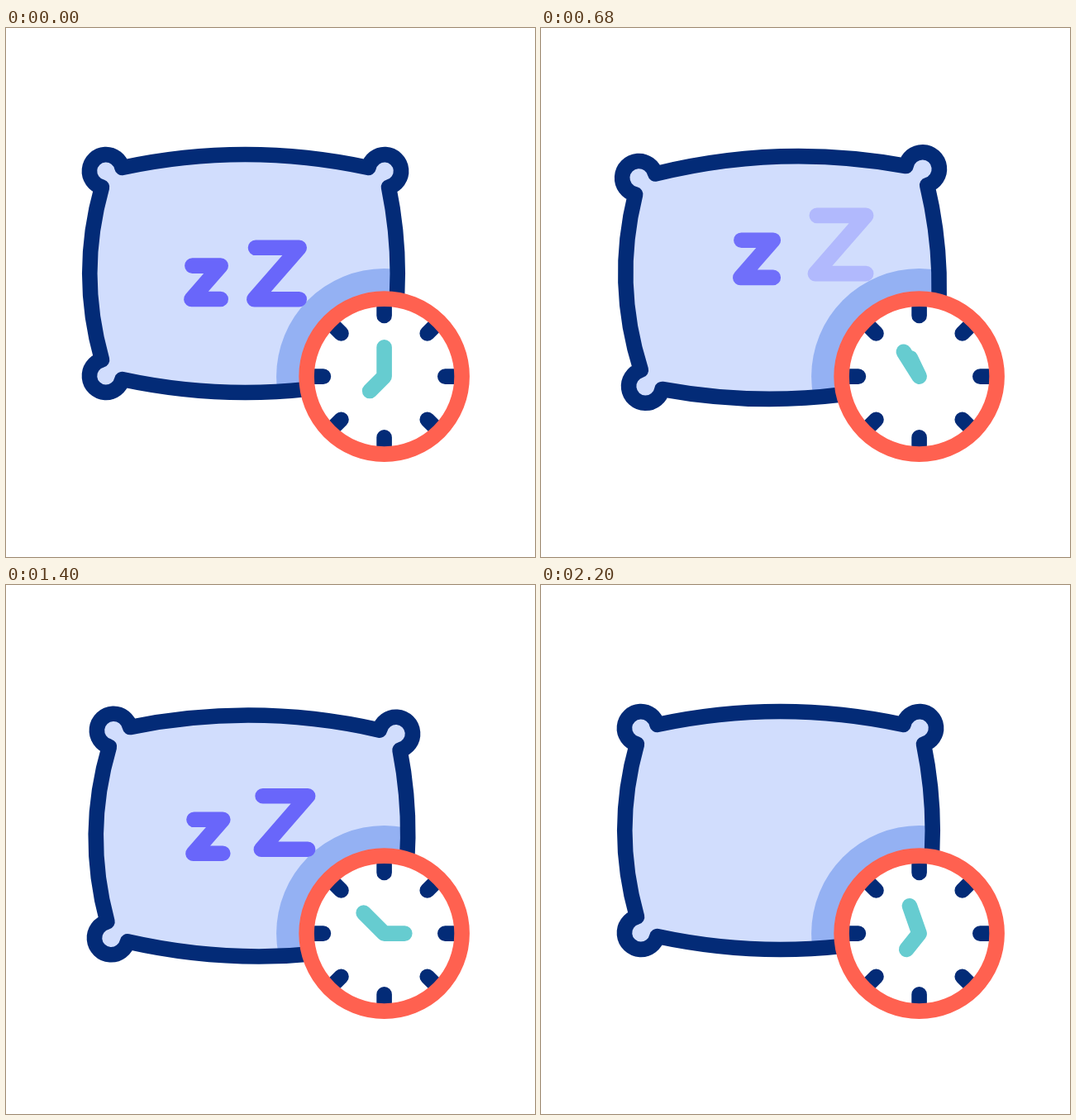
Recreate the animation shown at these times as an HTML page with a canvas. Size 640x640 px, loop 2.24 s.

```html
<!DOCTYPE html>
<html lang="en">
<head>
<meta charset="utf-8">
<title>Sleep time</title>
<style>
html, body { margin: 0; width: 100%; height: 100%; overflow: hidden; background: #fff; }
canvas { display: block; }
</style>
</head>
<body>
<canvas id="stage" width="640" height="640"></canvas>
<script>
const ctx = document.getElementById('stage').getContext('2d');
const LOOP = 2240, CYCLE = LOOP / 2, STEP = 40;
const NAVY = '#032b77', RED = '#ff6150', TEAL = '#66ccd0', VIOLET = '#6966fa';
const CLOCK = { x: 457.6, y: 421.6 };

// Outlines are centred on their own origin
const pillow = new Path2D(
  'M-149 -128 Q0 -160 149 -128 A20 20 0 1 1 173.5 -104.5 Q195 0 173.5 104.5 ' +
  'A20 20 0 1 1 149 128 Q0 160 -149 128 A20 20 0 1 1 -173.5 104.5 ' +
  'Q-203 0 -173.5 -104.5 A20 20 0 1 1 -149 -128Z');
const bigZ = new Path2D('M-25.5 -31.2 H27.2 L-27.2 31.2 H27.2');
const smallZ = new Path2D('M-16.8 -20.2 H17.5 L-17.8 20.2 H17.5');

// Pillow pose keys: time, x, y, degrees, scale
const poses = [
  [0, 289.5, 297, 0, 1],
  [440, 299, 300, 1.8, 1.045],
  [680, 294, 302, -1.8, 1.018],
  [1000, 289.5, 300.5, -0.9, 0.97],
  [1400, 299.5, 303.5, 0.67, 1.0134],
  [1720, 285.5, 297, 0, 0.976],
  [2160, 289.5, 297, 0, 1],
  [2240, 289.5, 297, 0, 1]
];
// Rise of each letter: time, distance
const bigRise = [[0, 0], [200, 4.5], [280, 9.5], [440, 21.5], [600, 30.3], [680, 35], [1120, 60]];
const smallRise = [[0, 0], [160, 0], [280, 3.5], [440, 13], [600, 21.7], [680, 28.5], [1120, 60]];

// Monotone cubic interpolation of column c
function ease(keys, c, t) {
  const slope = i => (keys[i + 1][c] - keys[i][c]) / (keys[i + 1][0] - keys[i][0]);
  const tangent = i => {
    if (i === 0 || i === keys.length - 1) return 0;
    const a = slope(i - 1), b = slope(i);
    return a * b > 0 ? 2 * a * b / (a + b) : 0;
  };
  let i = 0;
  while (i < keys.length - 2 && t >= keys[i + 1][0]) i++;
  const span = keys[i + 1][0] - keys[i][0], u = (t - keys[i][0]) / span, v = 1 - u;
  return keys[i][c] * v * v * (1 + 2 * u) + keys[i + 1][c] * u * u * (3 - 2 * u) +
    span * u * v * (tangent(i) * v - tangent(i + 1) * u);
}

function place(path, x, y, scale, angle = 0) {
  const placed = new Path2D();
  placed.addPath(path, new DOMMatrix().translate(x, y).rotate(angle).scale(scale));
  return placed;
}

function stroke(color, path) {
  ctx.strokeStyle = color;
  ctx.stroke(path);
}

function disc(radius) {
  const path = new Path2D();
  path.arc(CLOCK.x, CLOCK.y, radius, 0, 2 * Math.PI);
  return path;
}

// Point on the clock face, degrees clockwise from twelve
function polar(radius, degrees) {
  const a = degrees * Math.PI / 180;
  return [CLOCK.x + radius * Math.sin(a), CLOCK.y - radius * Math.cos(a)];
}

function drawPillow(t) {
  const [x, y, angle, scale] = [1, 2, 3, 4].map(c => ease(poses, c, t));
  const shape = place(pillow, x, y, scale, angle);
  ctx.fillStyle = '#d1ddfd';
  ctx.fill(shape);
  ctx.save();
  ctx.clip(shape);
  ctx.fillStyle = '#94b1f3';
  ctx.fill(disc(130.5));
  ctx.restore();
  stroke(NAVY, shape);
}

function drawLetter(path, x, y, drift, growth, rise, fadeAt, t) {
  const d = ease(rise, 1, t);
  ctx.globalAlpha = Math.max(0, Math.min(1, 1 - (t - fadeAt) / 130));
  stroke(VIOLET, place(path, x + drift * d, y - d, 1 + growth * d));
  ctx.globalAlpha = 1;
}

function drawClock(t) {
  ctx.fillStyle = '#fff';
  ctx.fill(disc(94));
  const ticks = new Path2D();
  for (let a = 0; a < 360; a += 45) {
    ticks.moveTo(...polar(73.7, a));
    ticks.lineTo(...polar(90, a));
  }
  stroke(NAVY, ticks);
  stroke(RED, disc(94));
  const turn = 360 * t / LOOP, hands = new Path2D();
  hands.moveTo(...polar(35.3, 3 * turn));
  hands.lineTo(CLOCK.x, CLOCK.y);
  hands.lineTo(...polar(24.7, 225 + turn));
  stroke(TEAL, hands);
}

function draw(now) {
  const t = Math.floor(now % LOOP / STEP) * STEP, phase = t % CYCLE;
  ctx.clearRect(0, 0, 640, 640);
  ctx.lineWidth = 18.6;
  ctx.lineCap = ctx.lineJoin = 'round';
  drawPillow(t);
  drawLetter(smallZ, 242.2, 307.8, 0.667, 0.0042, smallRise, 670, phase);
  drawLetter(bigZ, 327.5, 297, 1, 0.0036, bigRise, 590, phase);
  drawClock(t);
  requestAnimationFrame(draw);
}
requestAnimationFrame(draw);
</script>
</body>
</html>
```
